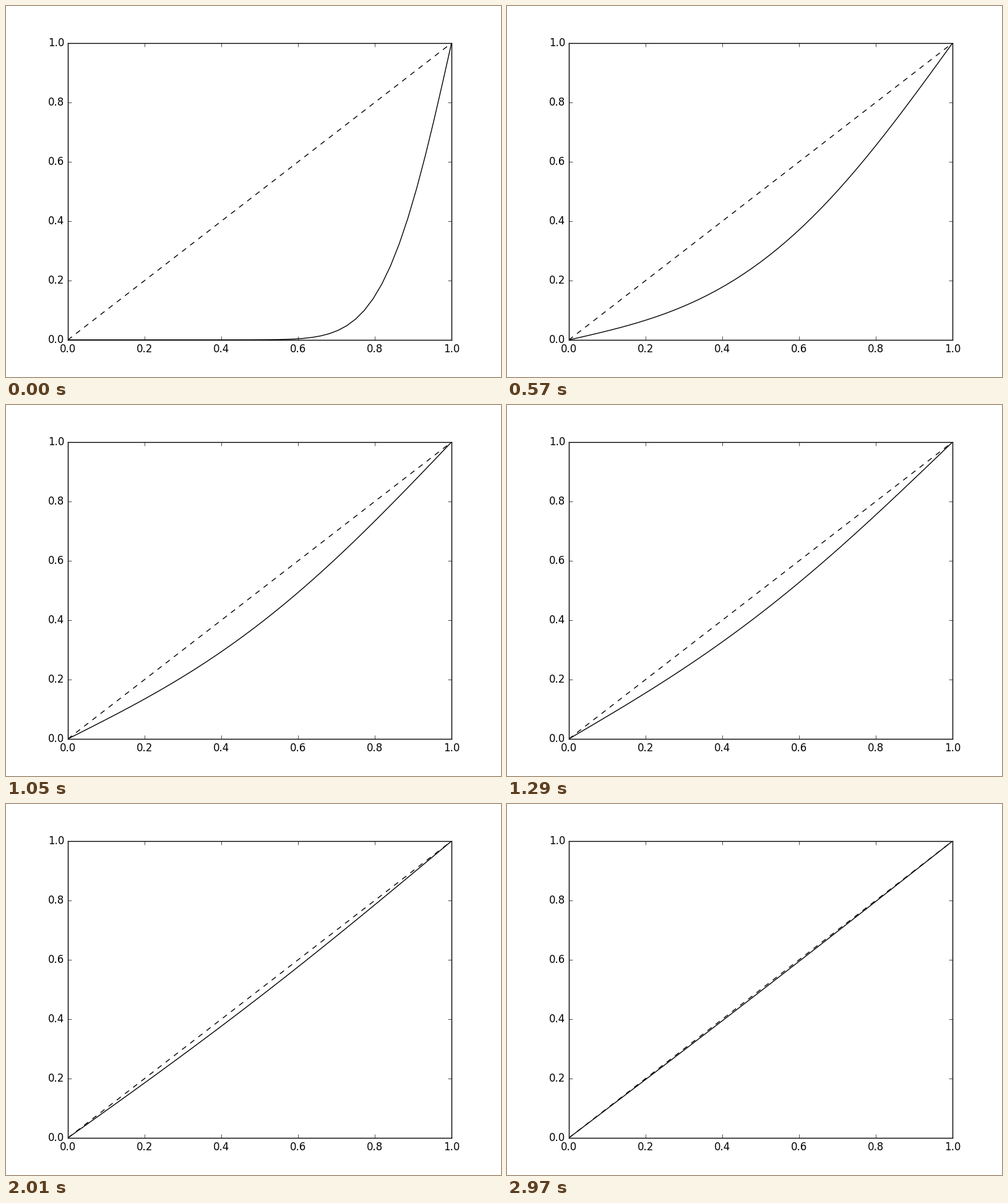
A matplotlib script that plays this animation: 800x600 px, repeating every 3000 ms.

```python
import numpy as np
import matplotlib.pyplot as plt
from matplotlib.animation import FuncAnimation

FRAMES = 100
INTERVAL = 30      # ms
STEP = 0.00476     # diffusion time per frame
MODES = np.arange(1, 45)

plt.style.use("classic")
plt.rcParams["figure.facecolor"] = "white"
plt.rcParams["font.family"] = "DejaVu Sans"

x = np.linspace(0, 1, 45)
waves = np.sin(np.pi * np.outer(x, MODES))
weights = 2 * (-1.0) ** MODES / (np.pi * MODES)


def profile(t):
    """Heat in a rod, cold at first, with its ends held at 0 and 1."""
    decay = np.exp(-(np.pi * MODES) ** 2 * t)
    return x + waves @ (weights * decay)


fig, ax = plt.subplots(figsize=(8, 6), dpi=100)
ax.set_xlim(0, 1)
ax.set_ylim(0, 1)
ax.plot([0, 1], [0, 1], "k--")
curve, = ax.plot(x, profile(2 * STEP), "k-")


def update(i):
    curve.set_ydata(profile((i + 2) * STEP))
    return curve,


anim = FuncAnimation(fig, update, frames=FRAMES, interval=INTERVAL,
                     repeat=True, repeat_delay=0, blit=False)
plt.show()
```
